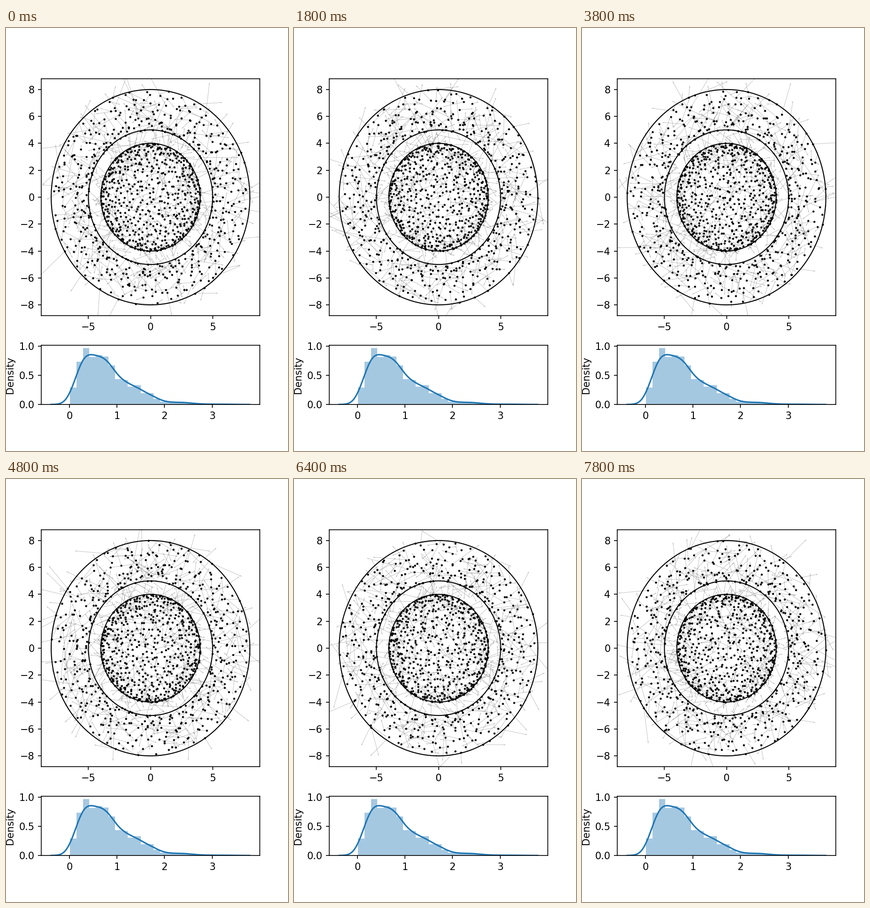
Recreate the animation shown at these times as a matplotlib script. Size 600 px wide and 900 px high, loop 8 s.

```python
import numpy as np
import matplotlib.pyplot as plt
from matplotlib.animation import FuncAnimation

FRAMES, INTERVAL = 40, 200
N_DISC, N_RING = 560, 500
R_DISC, R_IN, R_OUT = 4, 5, 8
STEP = 0.08                     # distance per frame at unit speed
GOLDEN = np.pi * (3 - np.sqrt(5))

rng = np.random.default_rng(12)


def spiral(radii):
    """Spread points evenly round the centre at the given radii."""
    a = GOLDEN * np.arange(len(radii))
    return radii[:, None] * np.column_stack([np.cos(a), np.sin(a)])


def fractions(n):
    return (np.arange(n) + 0.5) / n


class Swarm:
    """Particles roaming in small loops, held between two rims."""

    def __init__(self, radii, speed, low, high):
        n = len(radii)
        self.low, self.high = low, high
        self.home = spiral(radii)
        self.speed = rng.rayleigh(speed, n)
        self.turn = rng.uniform(0.18, 0.4, n) * rng.choice([-1, 1], n)
        self.phase = rng.uniform(0, 2 * np.pi, n)

    def state(self, t):
        a = self.phase + self.turn * t
        loop = np.column_stack([np.sin(a), -np.cos(a)])
        pos = self.home + (self.speed * STEP / self.turn)[:, None] * loop
        r = np.linalg.norm(pos, axis=1)
        pos *= (np.clip(r, self.low, self.high) / r)[:, None]
        vel = self.speed[:, None] * np.column_stack([np.cos(a), np.sin(a)])
        return pos, vel


# The disc is a dome seen from above; the ring thins out towards its rim
dome = R_DISC * np.sqrt(1 - (1 - fractions(N_DISC)) ** 2)
ring = R_IN + (R_OUT - R_IN) * fractions(N_RING) ** 1.35
swarms = [Swarm(dome, 0.42, 0, R_DISC), Swarm(ring, 0.8, R_IN, R_OUT)]


def state(t):
    pos, vel = zip(*(s.state(t) for s in swarms))
    return np.vstack(pos), np.vstack(vel)


fig, (ax, hist) = plt.subplots(
    2, 1, figsize=(4, 6), dpi=150,
    gridspec_kw=dict(height_ratios=[4, 1], hspace=0.2,
                     left=0.125, right=0.9, bottom=0.11, top=0.88))

# Particle view
ax.set(xlim=(-8.8, 8.8), ylim=(-8.8, 8.8),
       xticks=[-5, 0, 5], yticks=range(-8, 9, 2))
circle = np.linspace(0, 2 * np.pi, 400)
for radius in (R_DISC, R_IN, R_OUT):
    ax.plot(radius * np.cos(circle), radius * np.sin(circle), color="k", lw=1)

pos, vel = state(0)
arrows = ax.quiver(pos[:, 0], pos[:, 1], vel[:, 0], vel[:, 1],
                   color="gray", alpha=0.5, width=0.002,
                   scale_units="x", scale=0.7, zorder=1)
dots, = ax.plot(pos[:, 0], pos[:, 1], "o", color="k", ms=2.1, mew=0)

# Speed distribution
heights = np.array([0.29, 0.734, 0.968, 0.815, 0.85, 0.823, 0.67, 0.436,
                    0.42, 0.306, 0.33, 0.19, 0.19, 0.097, 0.05, 0.037,
                    0.036, 0.04, 0.03, 0.012, 0.008, 0.005, 0.004, 0.004,
                    0.006])
bin_w = 0.1354
left = 0.01 + bin_w * np.arange(len(heights))
hist.bar(left, heights, bin_w, align="edge", color="C0", alpha=0.4, lw=0)

bw = 0.137
x = np.linspace(-0.39, 3.79, 300)
mids = left + bin_w / 2
kernel = np.exp(-0.5 * ((x[:, None] - mids) / bw) ** 2)
density = kernel @ heights * bin_w / (bw * np.sqrt(2 * np.pi))
hist.plot(x, density, color="C0", lw=1.5)
hist.set(xlim=(-0.596, 4.004), ylim=(0, 1.0165), ylabel="Density",
         xticks=range(4), yticks=[0, 0.5, 1])


def update(i):
    pos, vel = state(i)
    dots.set_data(pos[:, 0], pos[:, 1])
    arrows.set_offsets(pos)
    arrows.set_UVC(vel[:, 0], vel[:, 1])
    return dots, arrows


anim = FuncAnimation(fig, update, frames=FRAMES, interval=INTERVAL,
                     repeat=True, repeat_delay=0)
plt.show()
```
